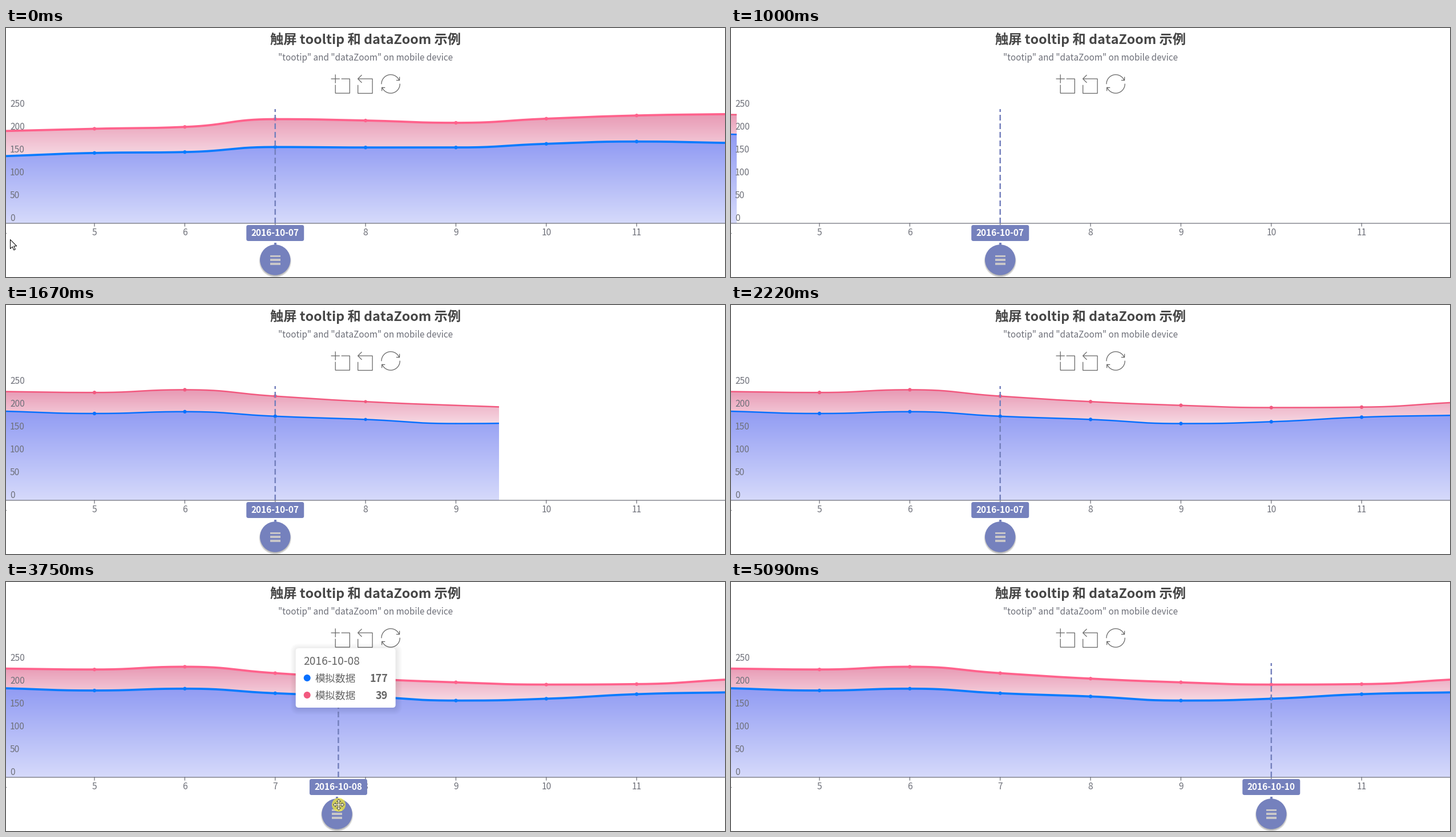
A matplotlib script that plays this animation: 1260x436 px, repeating every 6180 ms.

```python
import numpy as np
import matplotlib.pyplot as plt
from matplotlib.animation import FuncAnimation
from matplotlib.lines import Line2D
from matplotlib.patches import Circle, FancyBboxPatch, PathPatch, Polygon, Rectangle
from matplotlib.path import Path
from matplotlib.text import Text
from matplotlib.transforms import Affine2D

W, H, DPI = 1260, 436, 100
LOOP, TICK = 6180, 20
PX = 72 / DPI                      # one pixel in points
TOP, BASE = 142, 342               # plot area
UNIT = (BASE - TOP) / 250          # pixels per value
GAP = 158.36                       # pixels per day
FIRST_DAY, HOME = 4, 7
GREY, SLATE, DARK = "#6e7079", "#7581bd", "#666666"
BLUE, PINK = (7, 112, 255), (242, 89, 127)

plt.rcParams["font.family"] = "Noto Sans CJK JP"
plt.rcParams["toolbar"] = "None"

fig = plt.figure(figsize=(W / DPI, H / DPI), dpi=DPI, facecolor="white")
ax = fig.add_axes([0, 0, 1, 1])


def day_x(day):
    return 155 + (day - 5) * GAP


def rgb(c):
    return tuple(min(v, 255) / 255 for v in c)


# ---------- series ----------
XS = np.arange(W + 1)


def smooth(values):
    """Bezier curve through daily values, without overshoot, sampled per pixel."""
    ys = BASE - UNIT * np.array(values, float)
    ys = np.concatenate([[2 * ys[0] - ys[1]], ys, [2 * ys[-1] - ys[-2]]])
    before, after = np.diff(ys)[:-1], np.diff(ys)[1:]
    limit = np.minimum(np.abs(before), np.abs(after))
    slope = np.minimum(np.abs(before + after) / 4, limit) * np.sign(before)
    slope = np.pad(np.where(before * after > 0, slope, 0), 1)
    t = np.linspace(0, 1, 120)
    u = 1 - t
    px, py = [], []
    for i in range(len(ys) - 1):
        px.append(day_x(FIRST_DAY - 1 + i) + GAP * (1.5 * u * t + t ** 3))
        py.append(u ** 3 * ys[i] + 3 * u * u * t * (ys[i] + slope[i])
                  + 3 * u * t * t * (ys[i + 1] - slope[i + 1]) + t ** 3 * ys[i + 1])
    return np.interp(XS, np.concatenate(px), np.concatenate(py))


def blend(y, top, bottom, color):
    """Vertical gradient over white, from 56 % down to 21 % opacity."""
    a = np.interp(y, [top, bottom], [0.56, 0.21])[:, None, None]
    return 255 - a * (255 - np.array(color, float))


class Chart:
    """Two stacked series: blue at the bottom, pink on top of it."""

    def __init__(self, lower, upper):
        self.lower, self.upper = lower, upper
        self.blue = smooth(lower)
        self.pink = smooth(np.add(lower, upper))
        y = np.arange(TOP, BASE) + 0.5

        def below(curve):
            edge = (curve[:-1] + curve[1:]) / 2
            return np.clip(y[:, None] - edge + 0.5, 0, 1)[..., None]

        low, high = below(self.blue), below(self.pink)
        rose = blend(y, self.pink.min(), self.blue.max(), (213, 72, 120))
        iris = blend(y, self.blue.min(), BASE, (58, 77, 233))
        img = 255 * (1 - high) + rose * high
        self.area = (img * (1 - low) + iris * low).round().astype(np.uint8)

    def on(self, day):
        return self.lower[day - FIRST_DAY], self.upper[day - FIRST_DAY]


# daily values, from day 4 on
OLD = Chart([147, 154, 156, 167, 166, 166, 174, 179, 176],
            [55, 53, 55, 61, 59, 54, 55, 57, 63])
NEW = Chart([195, 190, 194, 184, 177, 168, 172, 182, 186],
            [43, 46, 48, 44, 39, 40, 31, 22, 28])

area = ax.imshow(OLD.area, extent=(0, W, BASE, TOP), aspect="auto",
                 interpolation="nearest", zorder=1)
ax.set(xlim=(0, W), ylim=(H, 0))
ax.axis("off")

MARKS = day_x(np.arange(5, 12))
pink_line, = ax.plot([], [], zorder=2, solid_capstyle="butt")
blue_line, = ax.plot([], [], zorder=2.5, solid_capstyle="butt")
pink_dots = ax.scatter(MARKS, MARKS, zorder=2.2, linewidths=0)
blue_dots = ax.scatter(MARKS, MARKS, zorder=2.7, linewidths=0)


# ---------- drawing helpers ----------
class Group:
    """Artists that move and fade together."""

    def __init__(self, z):
        self.move, self.z, self.parts = Affine2D(), z, []

    def add(self, *artists):
        for art in artists:
            art.set_transform(self.move + ax.transData)
            art.set_zorder(self.z + 0.01 * len(self.parts))
            ax.add_artist(art)
            self.parts.append((art, art.get_alpha() or 1))

    def place(self, x, y=0, alpha=1):
        self.move.clear().translate(x, y)
        for art, base in self.parts:
            art.set_visible(alpha > 0)
            art.set_alpha(base * alpha)


def label(x, y, s, size, color=GREY, ha="center", weight="normal"):
    return Text(x, y + 0.36 * size, s, fontsize=size * PX, color=color, ha=ha,
                va="baseline", fontweight=weight, zorder=4)


def stroke(points, width, color=GREY, **kw):
    xs, ys = zip(*points)
    return Line2D(xs, ys, lw=width * PX, color=color, snap=False, zorder=4, **kw)


def round_box(x, y, w, h, r, color, lw=0, **kw):
    return FancyBboxPatch((x, y), w, h, boxstyle=f"round,pad=0,rounding_size={r}",
                          fc=color, lw=lw * PX, **kw)


def outline(points, fill="white", edge="black"):
    return Polygon(points, closed=True, fc=fill, ec=edge, lw=PX, joinstyle="round")


def pen(points, x, y, scale, code=Path.LINETO):
    codes = [Path.MOVETO] + [code] * (len(points) - 1)
    path = Path(np.array(points) * scale + (x, y), codes)
    ax.add_patch(PathPatch(path, fc="none", ec=DARK, lw=1.25 * PX, snap=False, zorder=4))


# ---------- title ----------
ax.add_artist(label(630, 20, "触屏 tooltip 和 dataZoom 示例", 23.3, "#464646", weight="bold"))
ax.add_artist(label(630, 51, '"tootip" and "dataZoom" on mobile device', 15.3))

# ---------- toolbox: zoom, step back, restore (60-unit icons) ----------
NEAR, FAR, MID = 13.5, 58, 32
for pts in ([(0, NEAR), (27, NEAR)], [(NEAR, 0), (NEAR, 27)],
            [(MID, NEAR), (FAR, NEAR), (FAR, FAR), (NEAR, FAR), (NEAR, MID)]):
    pen(pts, 569.6, 81.4, 0.565)
for pts in ([(12, -12), (0, 0), (12, 12)], [(0, 0), (45, 0), (45, 45), (0, 45), (0, 19)]):
    pen(pts, 616.7, 89, 0.565)
ARC = np.array([(56.3, 20.1), (52.1, 9), (40.5, 0.6), (26.8, 2.1),
                (12.6, 3.7), (1.6, 16.2), (2.1, 30.6)])
HOOK = np.array([(47, 18.9), (56.8, 18.9), (56.8, 8.7)])
for flip in (False, True):
    for pts, code in ((ARC, Path.CURVE4), (HOOK, Path.LINETO)):
        pen(60 - pts if flip else pts, 656.8, 80.6, 0.578, code)

# ---------- axes ----------
ax.add_artist(stroke([(0, BASE), (W, BASE)], 1.25))
for value in range(0, 251, 50):
    ax.add_artist(label(7, BASE - 10 - UNIT * value, str(value), 15.6, ha="left"))
for day in range(FIRST_DAY, 12):
    x = day_x(day)
    ax.add_artist(stroke([(x, BASE), (x, BASE + 5)], 1.25))
    ax.add_artist(label(x, 357, str(day), 15.6))

# ---------- axis pointer ----------
pointer = Group(5)
date_tag = label(0, 358, "", 15.4, "white", weight="bold")
pointer.add(stroke([(0, BASE), (0, TOP)], 2.5, SLATE, ls=(0, (4, 2)), dash_capstyle="butt"),
            round_box(-50.5, 345, 101, 28, 3.5, SLATE), date_tag)

handle = Group(6)
handle.add(*[Circle((0, 408.3), 25.2 + k, fc="#888888", lw=0, alpha=0.22) for k in range(4)])
handle.add(Rectangle((-2, 375.8), 4, 6, fc=SLATE, lw=0),
           Circle((0, 406), 26.7, fc=SLATE, lw=0))
handle.add(*[Rectangle((-9.2, 404.3 + 6.7 * k), 18.4, 3.6, fc="#c8c6c8", lw=0)
             for k in (-1, 0, 1)])

# ---------- tooltip ----------
tip = Group(8)
tip.add(*[round_box(1 - g, 118 - g, 175 + 2 * g, 104 + 2 * g, 5 + g, "black", alpha=0.017)
          for g in range(0, 11, 2)])
tip_date = label(14, 138, "", 19.2, DARK, "left")
tip_values = [label(161.5, y, "", 18.1, DARK, "right", "bold") for y in (168, 198)]
tip.add(round_box(0, 116, 175, 104, 5, "white"), tip_date, *tip_values)
for y, color in ((168, BLUE), (198, PINK)):
    tip.add(Circle((20, y), 6, fc=rgb(color), lw=0),
            label(33.5, y, "模拟数据", 17.9, DARK, "left"))

# ---------- mouse ----------
halo, arrow, cross, hand = (Group(z) for z in (9, 9.5, 9.5, 9.5))
halo.add(Circle((0, 0), 12, fc="#f0e93c", lw=0, alpha=0.75))
arrow.add(outline([(0, 0), (0, 16), (3.7, 12.5), (6.3, 18.3), (8.8, 17.2),
                   (6.2, 11.5), (11.2, 11.3)]))
arm = [(-1.2, -1.2), (-1.2, -5.5), (-3.5, -5.5), (0, -9.5), (3.5, -5.5), (1.2, -5.5)]
cross.add(outline(np.concatenate([Affine2D().rotate_deg(90 * k).transform(arm)
                                  for k in range(4)]), "#fffbd0", "#555555"))
hand.add(round_box(-4.5, 9, 15, 13, 4, "white", 1.1, ec="black"),
         round_box(-2, 0, 4, 14, 2, "white", 1.1, ec="black"),
         Rectangle((-1.4, 10), 5, 8, fc="white", lw=0))

# ---------- motion (ms) ----------
# The screen refreshes nine times a second while something moves.
REFRESH = 111
SWAP, DRAG, DROP = 996, 3423, 4760
STEPS = np.concatenate([[0, 100], np.arange(SWAP, 2230, REFRESH),
                        np.arange(2858, 5100, REFRESH)])
JUMPS = np.array([3680, 4124, 4402])     # pointer snaps to the next day
DRAG_END = 888


def unit(t, start, length):
    return np.clip((t - start) / length, 0, 1)


def ease(t, start, length):
    u = unit(t, start, length)
    return u * u * (3 - 2 * u)


def ease_out(t, start, length):
    return 1 - (1 - unit(t, start, length)) ** 3


def drag(t):
    return ease(t, DRAG, 967)


def handle_x(t):
    return (day_x(HOME) + (DRAG_END - day_x(HOME)) * drag(t)
            + (day_x(10) - DRAG_END) * ease_out(t, DROP, 300))


def pointer_x(t):
    return day_x(HOME + ease_out(t, JUMPS, 200).sum())


def draw_series(t):
    chart, reveal, grown, lift = OLD, W, np.ones(len(MARKS)), 1.0
    if t >= SWAP:
        chart = NEW
        reveal = W * unit(t, SWAP - 8, 983)
        grown = unit(t, SWAP - 8 + MARKS / W * 1000, 200)
        lift = unit(t, 3200, 300)
    cut = int(round(reveal))
    img = chart.area.copy()
    img[:, cut:] = 255
    area.set_data(img)
    for line, dots, ys, base in ((pink_line, pink_dots, chart.pink, PINK),
                                 (blue_line, blue_dots, chart.blue, BLUE)):
        color = rgb([c * (1 + 0.1 * lift) for c in base])
        line.set_data(XS[:cut + 1], ys[:cut + 1])
        line.set(color=color, linewidth=(2.5 + 1.25 * lift) * PX)
        dots.set_offsets(np.column_stack([MARKS, np.interp(MARKS, XS, ys)]))
        dots.set_sizes((6.25 * PX * grown) ** 2)
        dots.set_facecolor(color)


def draw_mouse(t):
    d = drag(t)
    x, y = handle_x(t) + 2 + 4 * d, 408 - 69 * d
    shape = None
    if t < 100:
        x, y, shape = 7.5, 370.5, arrow
    elif 2850 < t < 2960:
        x, y, shape = 460, 428, arrow
    elif 2960 < t < DROP:
        shape = cross if y > 379 else hand
    for group in (arrow, cross, hand):
        group.place(x, y, int(group is shape))
    halo.place(x, y, int(3180 < t < DROP - 50))


def update(i):
    now = i * TICK + TICK / 2
    t = STEPS[STEPS <= now][-1]
    draw_series(t)

    day = HOME + int((t >= JUMPS).sum())
    date = f"2016-10-{day:02d}"
    date_tag.set_text(date)
    pointer.place(pointer_x(t))
    handle.place(handle_x(t))

    tip_date.set_text(date)
    for text, value in zip(tip_values, NEW.on(day)):
        text.set_text(str(value))
    fade = unit(t, 3080, 200) * (1 - unit(t, DROP, 200))
    tip.place(handle_x(min(t, DROP) - 148), 0, fade)
    draw_mouse(t)
    return []


anim = FuncAnimation(fig, update, frames=LOOP // TICK, interval=TICK,
                     repeat=True, repeat_delay=0, blit=False)
plt.show()
```
